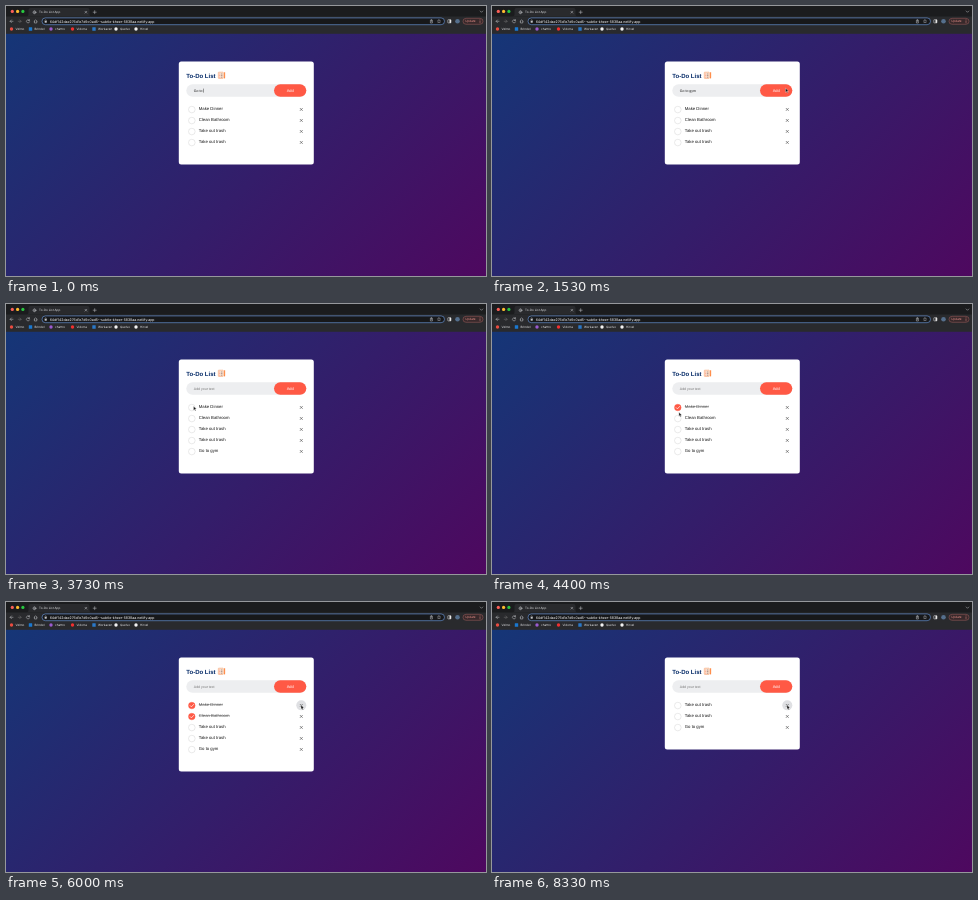
Animation of 480 by 270 pixels, one loop 8790 ms. Source, as an HTML page:

```html
<!DOCTYPE html>
<html lang="en">
<head>
<meta charset="utf-8">
<title>To-Do List App</title>
<style>
  html, body { margin: 0; width: 100%; height: 100%; overflow: hidden; background: #202124; }
  svg { display: block; width: 100vw; height: 100vh; }
  text { font-family: "Liberation Sans", Arial, sans-serif; text-rendering: geometricPrecision; white-space: pre; }
  .chrome text { font-family: Inter, Roboto, sans-serif; font-size: 3px; fill: #e4e5e8; }
  .line { fill: none; stroke: #c4c6ca; stroke-width: .5; stroke-linecap: round; stroke-linejoin: round; }
  .task { font-size: 4.25px; fill: #111; }
  .done .task { fill: #555; text-decoration: line-through; }
  .box { fill: #fff; stroke: #c9c9c9; stroke-width: .4; }
  .done .box { fill: #ff5945; stroke: #ff5945; }
  .tick { fill: none; stroke: #fff; stroke-width: .7; stroke-linecap: round; stroke-linejoin: round; visibility: hidden; }
  .done .tick { visibility: visible; }
  .cross { stroke: #444; stroke-width: .6; }
  .halo { fill: #dfe0e3; visibility: hidden; }
  .hover .halo { visibility: visible; }
</style>
</head>
<body>
<svg viewBox="0 0 480 270" preserveAspectRatio="none">
  <defs>
    <linearGradient id="sky" gradientUnits="userSpaceOnUse" x1="59.5" y1="-31.5" x2="420.5" y2="329.5">
      <stop stop-color="#153677"/><stop offset="1" stop-color="#4e085f"/>
    </linearGradient>
  </defs>

  <g class="chrome">
    <rect width="480" height="28" fill="#292a2d"/>
    <rect width="480" height="10.5" fill="#1b1c1e"/>
    <path d="M20.5 10.5Q22.5 10.5 22.5 8.5V4Q22.5 2 24.5 2H81.5Q83.5 2 83.5 4V8.5Q83.5 10.5 85.5 10.5Z" fill="#292a2d"/>
    <circle cx="6.3" cy="5.4" r="1.6" fill="#fb5f57"/>
    <circle cx="11.6" cy="5.4" r="1.6" fill="#fdbc2e"/>
    <circle cx="16.9" cy="5.4" r="1.6" fill="#28c840"/>
    <g class="line">
      <circle cx="28.5" cy="6.3" r="1.4"/>
      <path d="M27.1 6.3h2.8M28.5 4.9v2.8" stroke-width=".3"/>
      <path d="M79 5.3l1.8 1.8m0-1.8l-1.8 1.8M87.2 6.2h3m-1.5-1.5v3M474.2 5l1.3 1.3L476.800 5"/>
      <path d="M7 15.300H4.200m1.300-1.400l-1.400 1.400 1.400 1.400"/>
      <path d="M12.200 15.300h2.800m-1.300-1.400l1.400 1.400-1.400 1.400" stroke="#777"/>
      <path d="M23.300 14.300a1.600 1.600 0 1 0 .3 1.500m-.2-2.300v1h-1"/>
      <path d="M28 15.400l1.600-1.500 1.600 1.500m-2.700-.3v1.900h2.200v-1.900"/>
    </g>
    <rect x="36" y="11.900" width="402.500" height="6.800" rx="3.400" fill="#17181a" stroke="#6f9fe8" stroke-width=".6"/>
    <rect x="38.700" y="15" width="2" height="1.700" fill="#c4c6ca"/>
    <path class="line" d="M39.100 15v-.6a.6.6 0 0 1 1.200 0v.6" stroke-width=".35"/>
    <text x="43.700" y="16.600" style="font-size:3.500px;fill:#fff">64df142dae276d1e7d9c0ad5--subtle-kheer-5838aa.netlify.app</text>
    <g class="line">
      <path d="M424.400 14.500v2.500h2v-2.500zM425.400 15.500v-2"/>
      <path d="M433 13.600l.5 1.200 1.200.1-.9.800.3 1.200-1.100-.7-1.100.7.3-1.200-.9-.800 1.200-.1z" stroke-width=".35"/>
    </g>
    <rect x="441.800" y="13.700" width="3.200" height="3.200" rx=".4" fill="none" stroke="#e8e8e8" stroke-width=".5"/>
    <rect x="443.500" y="13.700" width="1.500" height="3.200" fill="#e8e8e8"/>
    <circle cx="451.500" cy="15.300" r="2.300" fill="#556f8c"/>
    <rect x="457" y="12.300" width="20" height="6" rx="3" fill="#38292b" stroke="#bd6d6b" stroke-width=".4"/>
    <text x="459.300" y="16.400" style="fill:#ee938c">Update</text>
    <path d="M474 13.900v.1m0 1.300v.1m0 1.300v.1" stroke="#ee938c" stroke-width=".6" stroke-linecap="round"/>
    <text x="33" y="7.400">To-Do List App</text>
    <g id="bookmarks"></g>
  </g>

  <rect y="27.800" width="480" height="242.200" fill="url(#sky)"/>

  <rect id="card" x="172.800" y="55.500" width="135" rx="2.500" fill="#fff"/>
  <text x="180.300" y="71.500" font-size="6" font-weight="bold" fill="#002765">To-Do List</text>
  <g fill="none" stroke-width=".6">
    <rect x="212.300" y="66.200" width="5" height="6.200" rx=".5" fill="#ffe9d6" stroke="#f3a06e"/>
    <path d="M213.300 68h.8m-.8 1.600h.8m-.8 1.600h.8" stroke="#ff5945"/>
    <path d="M214.800 68h1.600m-1.600 1.600h1.600m-1.600 1.600h1.600" stroke="#7a5a56"/>
    <path d="M218.600 66.300v4.800l-.1 1.300" stroke="#ff8a45" stroke-width="1.100"/>
  </g>
  <rect x="180.300" y="78.300" width="120" height="12.500" rx="6.250" fill="#edeef0"/>
  <text id="field" x="187.800" y="85.800" font-size="3.500"></text>
  <rect id="caret" y="82.600" width=".4" height="4" fill="#111"/>
  <rect x="268" y="78.300" width="32.300" height="12.500" rx="6.250" fill="#ff5945"/>
  <text x="284.200" y="85.900" font-size="4" fill="#fff" text-anchor="middle">Add</text>
  <g id="rows"></g>
  <path id="cursor" d="M0 0V4.100L1 3.200 1.700 4.700 2.400 4.400 1.700 2.900H3Z" fill="#111" stroke="#fff" stroke-width=".35"/>
</svg>

<script>
const LOOP = 8790;
const ADD = 2270, CHECK_DINNER = 3870, CHECK_BATHROOM = 4870, DROP_DINNER = 6330, DROP_BATHROOM = 7330;
const ROW_TOP = 97.05, ROW_HEIGHT = 11;
const $ = id => document.getElementById(id);

const tasks = [
  { label: "Make Dinner", checked: CHECK_DINNER, removed: DROP_DINNER },
  { label: "Clean Bathroom", checked: CHECK_BATHROOM, removed: DROP_BATHROOM },
  { label: "Take out trash" },
  { label: "Take out trash" },
  { label: "Go to gym", added: ADD }
];

// Pointer stops: time, x, y
const path = [
  [1000, 222, 86], [1500, 293.5, 82.2], [2000, 293.5, 82.2], [2270, 291.8, 83.5],
  [2670, 291.8, 83.5], [3530, 187.5, 102.2], [4130, 187.5, 102.2], [4670, 186.3, 114.3],
  [5270, 186.3, 114.3], [5780, 306, 105], [6000, 295, 103.2], [LOOP, 295, 103.2]
];

const bookmarks = [
  [5.5, "Velmo", "#e94c40"], [24.5, "Brindel", "#1a78d0", true], [45, "chattro", "#9a5bd0"],
  [66.5, "Vidorra", "#f03030"], [88, "Workaven", "#2a78c8", true], [110, "Quelvo", "#f2f2f2"],
  [130, "Hirvel", "#f2f2f2"]
];
$("bookmarks").innerHTML = bookmarks.map(([x, name, color, square]) =>
  `<rect x="${x - 1.7}" y="21.3" width="3.4" height="3.4" rx="${square ? 0.3 : 1.7}" fill="${color}"/>
   <text x="${x + 4}" y="24.1">${name}</text>`).join("");

$("rows").innerHTML = tasks.map(task => `<g>
  <circle class="box" cx="185.8" cy="6.5" r="3.3"/>
  <path class="tick" d="M184.2 6.6l1.2 1.2 2.200-2.400"/>
  <text class="task" x="192.8" y="7.1">${task.label}</text>
  <circle class="halo" cx="295.3" cy="6.3" r="5"/>
  <path class="cross" d="M293.9 5l2.800 2.800m0-2.800l-2.800 2.800"/>
</g>`).join("");
const rows = [...$("rows").children];

const ease = u => u * u * (3 - 2 * u);

function pointerAt(t) {
  const next = path.findIndex(stop => stop[0] > t);
  if (next < 1) return null;
  const [t0, x0, y0] = path[next - 1], [t1, x1, y1] = path[next];
  const u = ease((t - t0) / (t1 - t0));
  return { x: x0 + (x1 - x0) * u, y: y0 + (y1 - y0) * u };
}

function drawField(t) {
  const typing = t < ADD;
  const letters = t < 70 ? 0 : Math.min(3, 1 + Math.floor((t - 70) / 230));
  const typed = "Go to gym".slice(0, 6 + letters);
  const caretX = 197.4 + [0, 1.95, 3.7, 6.6][letters];
  $("field").textContent = typing ? typed : "Add your text";
  $("field").setAttribute("fill", typing ? "#111" : "#757575");
  $("caret").setAttribute("x", caretX);
  $("caret").style.visibility = typing && t % 1000 < 500 ? "visible" : "hidden";
}

function drawList(t, pointer) {
  let slot = 0;
  tasks.forEach(({ added = 0, checked = Infinity, removed = Infinity }, i) => {
    const row = rows[i], shown = t >= added && t < removed;
    row.style.display = shown ? "" : "none";
    if (!shown) return;
    const top = ROW_TOP + ROW_HEIGHT * slot++;
    const hover = pointer && Math.hypot(pointer.x - 295.3, pointer.y - top - 6.3) < 5;
    row.setAttribute("transform", `translate(0 ${top})`);
    row.classList.toggle("done", t >= checked);
    row.classList.toggle("hover", Boolean(hover));
  });
  $("card").setAttribute("height", 59.05 + ROW_HEIGHT * slot);
}

function draw(t) {
  const pointer = pointerAt(t);
  drawField(t);
  drawList(t, pointer);
  $("cursor").style.display = pointer ? "" : "none";
  if (pointer) $("cursor").setAttribute("transform", `translate(${pointer.x} ${pointer.y})`);
}

const start = performance.now();
function tick() {
  draw((performance.now() - start) % LOOP);
  requestAnimationFrame(tick);
}
tick();
</script>
</body>
</html>
```
